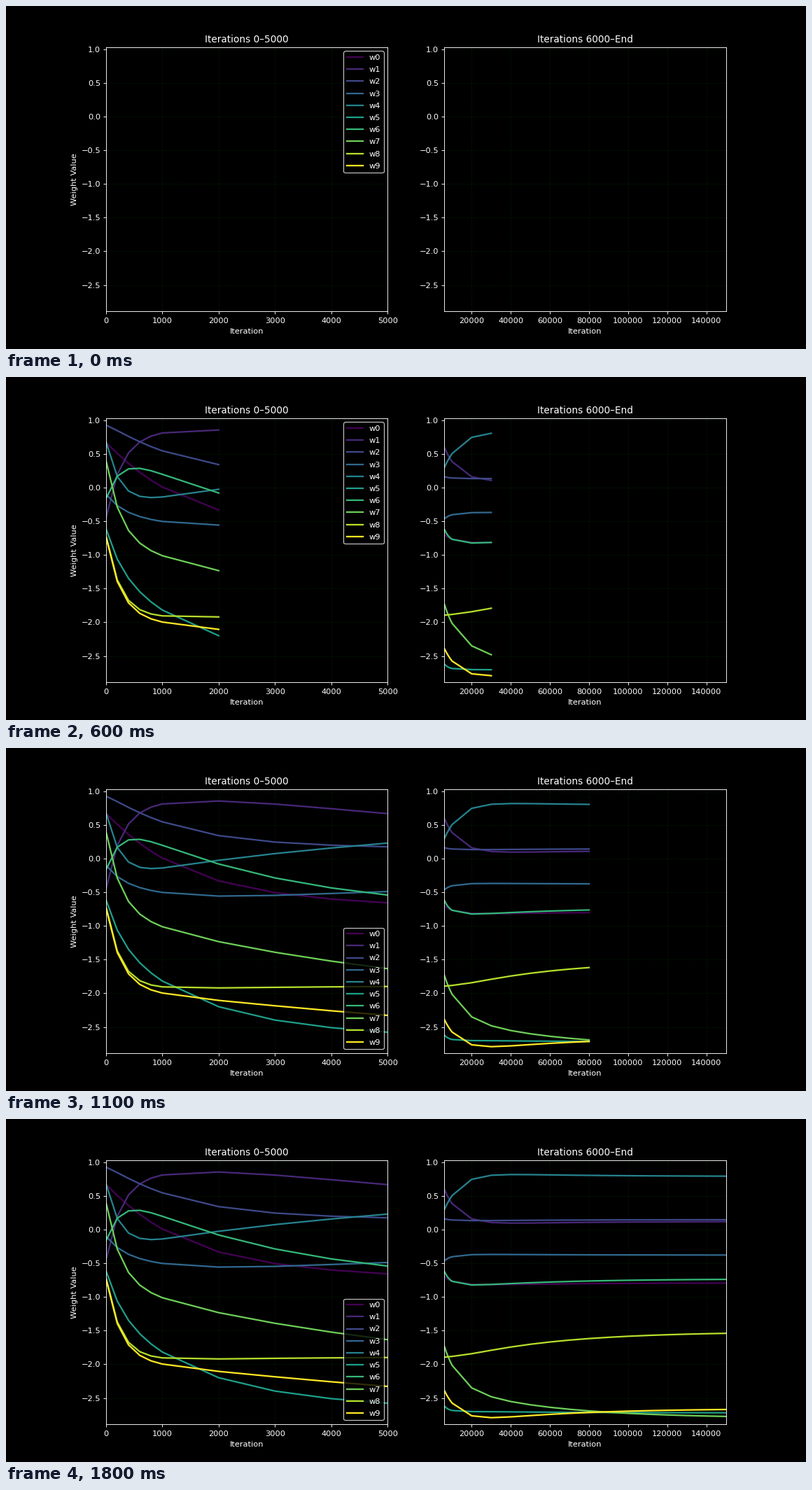
Recreate the animation shown at these times as a matplotlib script. Size 1143 by 490 pixels, loop 1.9 s.

```python
import numpy as np
import matplotlib.pyplot as plt
from matplotlib.animation import FuncAnimation

W, H, DPI = 1143, 490, 81.65
FRAMES, LOOP_MS = 19, 1900

# Every weight relaxes as a sum of decays that share these time constants.
TAUS = np.array([260, 1200, 3000, 7500, 50e3])

# A few points that each weight passes: values at these iterations.
KEY_STEPS = [0, 400, 1000, 3000, 10e3, 30e3, 150e3]
KEYS = np.array([
    [.67, .36, .01, -.505, -.765, -.817, -.793],
    [-.45, .51, .823, .805, .39, .105, .12],
    [.93, .76, .55, .245, .145, .135, .148],
    [-.10, -.36, -.51, -.54, -.405, -.366, -.377],
    [.68, -.045, -.145, .08, .505, .81, .795],
    [-.61, -1.35, -1.815, -2.40, -2.685, -2.705, -2.72],
    [-.16, .275, .205, -.29, -.765, -.815, -.738],
    [.40, -.63, -1.02, -1.385, -2.02, -2.48, -2.775],
    [-.72, -1.67, -1.91, -1.908, -1.885, -1.79, -1.54],
    [-.73, -1.705, -2.005, -2.18, -2.58, -2.791, -2.672],
])

EARLY = np.r_[0:1000:200, 1000:5001:1000]
LATE = np.r_[6000:10000:1000, 10000:150001:10000]


def decays(steps):
    """One column per decay, and a constant column for the final value."""
    steps = np.asarray(steps, float)[:, None]
    return np.hstack([np.exp(-steps / TAUS), np.ones_like(steps)])


amplitudes = np.linalg.lstsq(decays(KEY_STEPS), KEYS.T, rcond=None)[0]

plt.style.use("dark_background")
plt.rcParams["font.family"] = "DejaVu Sans"
fig, axes = plt.subplots(1, 2, figsize=((W + .01) / DPI, (H + .01) / DPI), dpi=DPI)
fig.subplots_adjust(left=.125, right=.9, bottom=.11, top=.88, wspace=.201)
colors = plt.cm.viridis(np.linspace(0, 1, len(KEYS)))

traces = []
for ax, steps, title in zip(axes, (EARLY, LATE),
                            ("Iterations 0–5000", "Iterations 6000–End")):
    ax.set(xlim=(steps[0], steps[-1]), ylim=(-2.891, 1.033),
           title=title, xlabel="Iteration")
    ax.tick_params(axis="x", pad=4.4)
    ax.grid(True, color="green", linestyle=":", alpha=0.3)
    for n, values in enumerate((decays(steps) @ amplitudes).T):
        line, = ax.plot([], [], color=colors[n], lw=2, label=f"w{n}")
        traces.append((line, steps, values))
axes[0].set_ylabel("Weight Value")
legend = axes[0].legend(loc="upper right", edgecolor="white", labelspacing=.635)


def update(frame):
    shown = frame + 1
    for line, x, y in traces:
        line.set_data(x[:shown], y[:shown])
    # The legend drops down once the early curves reach the right edge.
    legend.set_loc("upper right" if shown < len(EARLY) else "lower right")
    return [line for line, _, _ in traces]


anim = FuncAnimation(fig, update, frames=FRAMES, interval=LOOP_MS / FRAMES,
                     repeat=True, repeat_delay=0)
plt.show()
```
